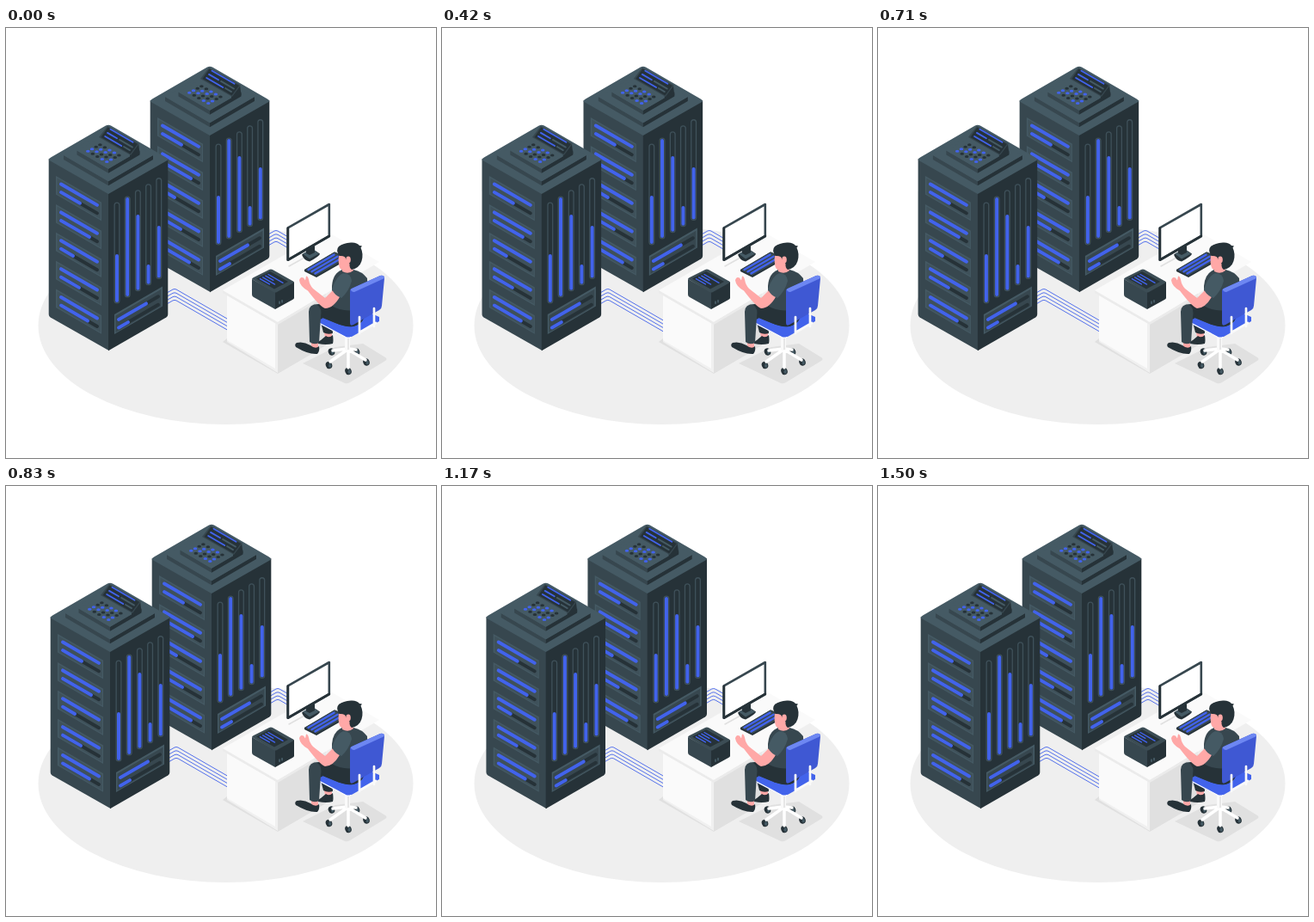
These frames come from a looping animation (500x500 px, 1.54 s). An HTML page:

```html
<!DOCTYPE html>
<html lang="en">
<head>
<meta charset="utf-8">
<title>Server room</title>
<style>
  html, body { margin: 0; width: 100%; height: 100%; overflow: hidden; background: #fff; }
  svg { display: block; width: 100%; height: 100%; }
  .ink { fill: #263238; }
  .mid { fill: #37474f; }
  .lit { fill: #455a64; }
  .blue { fill: #4263eb; }
  .skin { fill: #ffa8a7; }
  .line { fill: none; stroke-linecap: round; stroke-linejoin: round; }
</style>
</head>
<body>
<svg viewBox="0 0 500 500">
  <defs><g id="rack"></g></defs>
  <ellipse cx="255.500" cy="346" rx="218" ry="115" fill="#efefef"/>

  <g id="racks">
    <use href="#rack" x="118" y="-68"/>
    <use href="#rack"/>
  </g>

  <g id="desk">
    <path d="M252 365L316 402L364 374L352 366L257 361Z" fill="#e0e0e0"/>
    <path d="M316 340L372 308V369L316 401Z" fill="#e0e0e0"/>
    <path d="M257 307L316 341V401L257 365Z" fill="#f0f0f0"/>
    <path d="M257 311L313 343V396L257 363Z" fill="#fafafa"/>
    <path d="M252 305L316 342L372 309V312L316 345L252 308Z" fill="#ebebeb"/>
    <path d="M252 305L372 236L434 272L316 342Z" fill="#fafafa"/>
    <path d="M329 277L347 267" class="line" stroke="#e0e0e0" stroke-width="1.500"/>
  </g>

  <g id="monitor">
    <path class="ink" d="M344 263.500L356 256.500L365 262.500Q365 265 353 271.500Q346 270 344 263.500Z"/>
    <path class="lit" d="M345 262.500L356 256.500L364 262.500L353 268.500Z"/>
    <path class="ink" d="M349 255L359 250V261L353 264L349 262Z"/>
    <path d="M327.800 232.300L375.800 205V242L327.800 269.700Z" fill="#fff" stroke="#37474f" stroke-width="2.600" stroke-linejoin="round"/>
    <path d="M327.800 233V269.700L375.800 242" class="line" stroke="#263238" stroke-width="2.800"/>
  </g>

  <g id="keyboard">
    <path class="ink" d="M347 281L380 261.500Q382 260 384 261L396 268V270L361 290L347 283Z"/>
    <path class="mid" d="M347 281L382 260.500L396 268L361 288Z"/>
  </g>

  <g id="box">
    <path class="mid" d="M286 292L313 307V327L288 313Q286 312 286 310Z"/>
    <path class="ink" d="M313 307L335 295V314Q335 315 333 316L313 327Z"/>
    <path d="M286 292Q286 291 288 290L306 281Q308 280 310 281L333 294Q336 295 333 297L315 307Q313 308 311 307Z" fill="#3c4d55"/>
    <path class="ink" d="M291 291.500L307 283L328 295L312 303.500Z"/>
    <path d="M318 318v2.500M321 316.500v2.500" class="line" stroke="#607d8b" stroke-width="1"/>
  </g>

  <path d="M345 390L394 413Q397 414 400 412L441 387Q444 385 441 383L415 367L383 371Z" fill="#e0e0e0"/>

  <g id="legs">
    <path class="skin" d="M370 354L379 353L379 361L371 360Z"/>
    <path class="ink" d="M380 357Q381 364 380 367Q372 369 363 367Q362 365 366 363L372 358Q376 361 380 357Z"/>
    <path class="ink" d="M363 330L378 332L380 355Q374 357 369 354Z"/>
    <path class="skin" d="M354.500 363L363 363V373L355.500 373Z"/>
    <path class="ink" d="M364 370Q365 376 362 379Q352 380 337 371Q335 368 338 366Q346 364 354 369Q360 374 364 370Z"/>
  </g>

  <g id="chair-base">
    <g class="ink" id="wheels"></g>
    <path d="M397 373L380 375M397 374L377 388M398 374L398 395M398 374L418 386M398 373L407 374" class="line" stroke="#fff" stroke-width="3.500"/>
    <path d="M394 357H400V374Q397 376 394 374Z" fill="#fafafa"/>
    <path d="M398 359V374" stroke="#e0e0e0" stroke-width="1.500"/>
    <path class="blue" d="M362 341L398 320L434 336L434 341L401 359.500Q398 361 395 359.500L362 343Z"/>
    <path d="M363 342.500L395 359.500Q398 361 401 359.500" class="line" stroke="#fff" stroke-width="1.300"/>
  </g>

  <g id="person">
    <path class="mid" d="M352 330Q352 321 363 321L384 318L416 328Q419 343 404 347Q394 348 383 343L366 336L364 366Q358 369 353 365Z"/>
    <path class="ink" d="M362 322L384 318L416 328Q419 343 404 347Q394 348 383 343L366 336Q368 326 362 322Z"/>
    <path class="mid" d="M391 281Q380 285 379 300L379 323Q392 332 417 326Q421 303 420 291Q414 283 404 281Z"/>
    <path class="skin" d="M391 274L402 274L404 282Q398 287 391 283Z"/>
    <path class="skin" d="M387.500 261Q386 269 387 275Q388 281 392 281.500Q399 281 403 273L402 258Z"/>
    <path class="ink" d="M387.500 265Q383 258 387 254Q392 250 401 249.500Q408 249 411 253L414 253.500L412.500 255.500Q416 263 413.500 271Q411 279 402 281Q399 279 399.500 274L395 268.500Q395 264.500 387.500 265Z"/>
    <ellipse class="skin" cx="398" cy="269.500" rx="2.800" ry="4"/>
    <path class="skin" d="M341 293.500Q342 288.500 346 290.500L348 293.500L349 288.500Q351 288.500 352 292.500Q353 299 357 303L371 314L380 305L389 311Q381 326 371 326Q365 324 351 305.500Q342 300.500 341 293.500Z"/>
    <path class="lit" d="M392 285Q384 288 379 304Q382 311 390 314Q399 306 402 294Q401 285 392 285Z"/>
  </g>

  <g id="chair-back">
    <path d="M400 306Q400 303 404 302L435 288Q440 287 440 291L437 323Q437 326 434 328L404 345Q400 347 400 343Z" fill="#3f58d3"/>
    <path d="M400.500 304.500Q401 303 404 302L435 288Q440 287 440 291L405 307Q403 307.500 400.500 304.500Z" fill="#6d87f2"/>
    <path d="M411 336V355M428 326V347M411 354L430 343" class="line" stroke="#fafafa" stroke-width="2.700"/>
  </g>
</svg>
<script>
const $ = id => document.getElementById(id);
const BLUE = '#4263eb', INK = '#263238', MID = '#37474f', LIT = '#455a64';
const SLOPE = 0.58;

const shape = (d, fill) => `<path d="${d}" fill="${fill}"/>`;
const stroke = (d, color, width) =>
  `<path class="line" d="${d}" stroke="${color}" stroke-width="${width}"/>`;
// Line along an isometric axis; dir is 1 for downhill, -1 for uphill
const iso = (x, y, w, dir, color, width) =>
  stroke(`M${x} ${y}l${w} ${w * SLOPE * dir}`, color, width);
const slab = (x, y, w, h, dir, fill) =>
  shape(`M${x} ${y}l${w} ${w * SLOPE * dir}v${h}l${-w} ${-w * SLOPE * dir}z`, fill);

function body() {
  return shape('M49.700 152L120 190V375.300L51.700 336.500Q49.700 335 49.700 333Z', MID) +
    shape('M119 190L188.300 152V333Q188.300 335 186.300 336.500L119 375.300Z', INK) +
    shape('M49.700 153.500Q49.700 151.500 52.500 150.300L116 113.600Q119 112 122 113.600L185.500 150.300Q188.300 151.500 188.300 153.500L119 193Z', LIT);
}

function shelves() {
  return [86, 97, 78, 85, 95].map((end, i) => {
    const y = i * 32.9;
    return slab(58, 172 + y, 53, 21.5, 1, LIT) +
      slab(59.5, 174.5 + y, 50.5, 18.5, 1, '#3f515a') +
      iso(64, 181.5 + y, 42, 1, BLUE, 4) +
      iso(64, 191 + y, 42, 1, INK, 4) +
      iso(64, 191 + y, end - 64, 1, BLUE, 4);
  }).join('');
}

function gauges() {
  return [263, 197, 217, 275, 230].map((top, i) => {
    const x = 129 + i * 12.2, y = 206 - i * 7.1;
    return stroke(`M${x} ${y}v111`, '#3f515a', 7) +
      stroke(`M${x} ${y}v111`, INK, 4.4) +
      stroke(`M${x} ${top + 2}V${y + 111}`, BLUE, 4);
  }).join('');
}

function drawer() {
  return slab(126, 333, 56, 23, -1, LIT) + slab(127.5, 334.5, 53, 19.5, -1, MID) +
    [[0, 32], [9.5, 11]].map(([dy, w]) =>
      iso(131, 339 + dy, 46, -1, INK, 4) + iso(131, 339 + dy, w, -1, BLUE, 4)).join('');
}

function rhomb(cx, cy, r, depth) {
  const h = r * SLOPE, l = cx - r, b = cy + h;
  return shape(`M${l} ${cy}L${cx} ${b}v${depth}L${l} ${cy + depth}Z`, MID) +
    shape(`M${cx} ${b}L${cx + r} ${cy}v${depth}L${cx} ${b + depth}Z`, INK) +
    shape(`M${l} ${cy}L${cx} ${cy - h}L${cx + r} ${cy}L${cx} ${b}Z`, LIT);
}

function panel() {
  let s = rhomb(119, 148, 52, 5) + rhomb(119, 142.5, 36.5, 5);
  for (let i = 0; i < 5; i++) for (let j = 0; j < 4; j++) {
    const color = (i * 3 + j * 5) % 4 < 2 ? BLUE : INK;
    s += `<ellipse cx="${95.3 + i * 5.5 + j * 4.7}" cy="${143.2 + i * 3.1 - j * 2.5}" rx="2.3" ry="1.5" fill="${color}"/>`;
  }
  s += shape('M154 134L155.500 146L144 152L144 146Z', INK) +
    shape('M118 114L155 134.500L145 148L108 127Z', MID) +
    shape('M118.500 115.500L153 135L144.500 146.500L110.500 127Z', INK);
  const rows = [[121.5, 117.7, 26, BLUE], [118, 121.9, 11, BLUE], [132, 129.9, 15, LIT],
    [115.2, 126, 19, BLUE], [137, 138, 7, LIT]];
  return s + rows.map(([x, y, w, c]) => iso(x, y, w, 1, c, 1.9)).join('');
}

function cables() {
  let s = '';
  for (let i = 0; i < 4; i++) {
    const y = 308 + i * 4.3;
    s += stroke(`M187 ${y}L194 ${y - 4}Q196 ${y - 5} 198 ${y - 4}L264 ${y + 34}`, BLUE, 0.9);
  }
  return s;
}

$('rack').innerHTML = cables() + body() + shelves() + gauges() + drawer() + panel();

for (let i = 0; i < 3; i++)
  $('keyboard').innerHTML += iso(351.5 + i * 4, 281 + i * 2.2, 30, -1, BLUE, 2.4);
for (let i = 0; i < 4; i++) {
  const x = 305 - i * 3.2, y = 286.5 + i * 1.7;
  $('box').innerHTML += iso(x, y, [17, 9, 14, 11][i], 1, BLUE, 1.4);
}
$('wheels').innerHTML = [[378.5, 376.5], [375.5, 392], [398, 399], [419, 388.5], [407.5, 376.5]]
  .map(([x, y]) => `<ellipse cx="${x}" cy="${y}" rx="3.7" ry="4.3" transform="rotate(-20 ${x} ${y})"/>` +
    `<ellipse cx="${x + 1.2}" cy="${y + .5}" rx="1.6" ry="2.6" fill="${LIT}"/>`).join('');

// Horizontal shake, eased between evenly spaced stops
const LOOP = 1540, SHAKE = 1500, FPS = 24, SCALE = 0.73;
const STOPS = [0, -1, 2, -4, 4, -4, 4, -4, 2, -1, 0];

function bezier(p, x1, y1, x2, y2) {
  const at = (u, a, b) => 3 * (1 - u) ** 2 * u * a + 3 * (1 - u) * u * u * b + u ** 3;
  let lo = 0, hi = 1;
  for (let i = 0; i < 24; i++) {
    const m = (lo + hi) / 2;
    if (at(m, x1, x2) < p) lo = m; else hi = m;
  }
  return at(lo, y1, y2);
}

function offset(ms) {
  const step = Math.floor((Math.floor(ms / 10) + 0.49) * FPS / 100);
  const pos = (step * 1000 / FPS % SHAKE) / SHAKE * 10;
  const i = Math.floor(pos + 1e-6);
  const e = bezier(Math.max(0, pos - i), 0.36, -0.01, 0.5, 1.38);
  return (STOPS[i] + (STOPS[(i + 1) % 11] - STOPS[i]) * e) * SCALE;
}

const start = performance.now();
function draw(now) {
  const t = Math.max(0, now - start) % LOOP;
  $('racks').setAttribute('transform', `translate(${offset(t).toFixed(3)} 0)`);
  requestAnimationFrame(draw);
}
draw(start);
</script>
</body>
</html>
```
